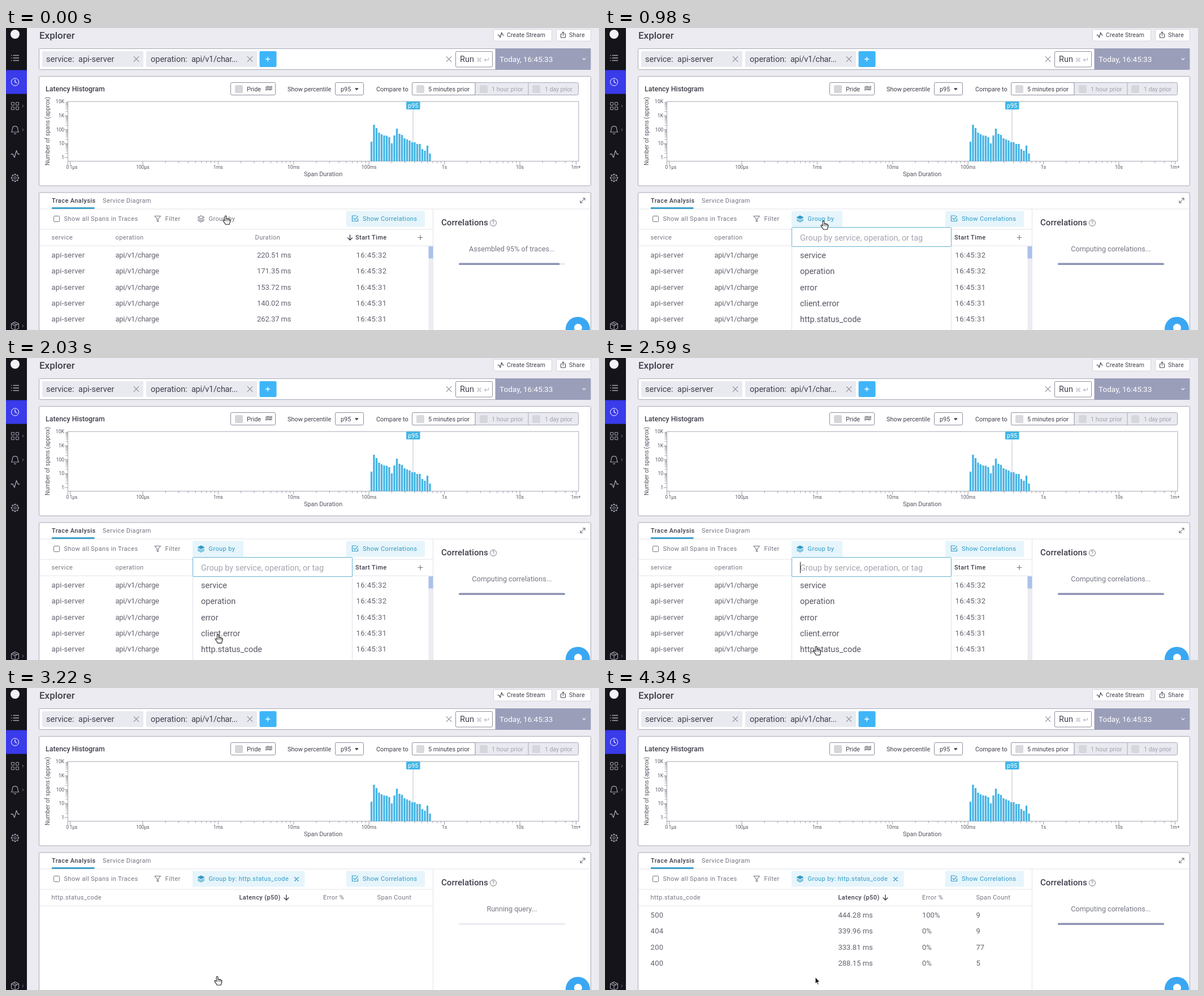
These frames come from a looping animation (1049 by 534 pixels, 4.41 s). An HTML page:

```html
<!DOCTYPE html>
<html lang="en">
<head>
<meta charset="utf-8">
<title>Explorer</title>
<style>
html, body { margin: 0; width: 100%; height: 100%; overflow: hidden; background: #ecebf1; }
svg { display: block; width: 100vw; height: 100vh; }
text { font-family: Roboto, "Liberation Sans", sans-serif; white-space: pre; }
</style>
</head>
<body>
<svg id="stage" viewBox="0 0 1049 534" preserveAspectRatio="none"></svg>
<script>
const LOOP = 4410;
const OPEN = 280, COMPUTE = 490, PICK = 2940, SKELETON = 3430, RESULT = 3850;
const INK = '#3f404c', GREY = '#757783', BLUE = '#2f9bc6', EDGE = '#a8a9b6', LINE = '#e4e4eb', PALE = '#e6f5fb';
const ROWS = [401, 429.5, 458, 486, 514.5];
const TOOLS = 337.4;

const rect = (x, y, w, h, fill, stroke = 'none', r = 0) =>
  `<rect x="${x}" y="${y}" width="${w}" height="${h}" fill="${fill}" stroke="${stroke}" rx="${r}"/>`;
const path = (d, stroke, width = 1.2, fill = 'none') =>
  `<path d="${d}" stroke="${stroke}" stroke-width="${width}" fill="${fill}" stroke-linecap="round" stroke-linejoin="round"/>`;
const dot = (x, y, r, fill, stroke = 'none') => `<circle cx="${x}" cy="${y}" r="${r}" fill="${fill}" stroke="${stroke}"/>`;
const at = (x, y, body) => `<g transform="translate(${x} ${y})">${body}</g>`;
const group = (id, body) => `<g id="${id}">${body}</g>`;

// y is the middle of the capitals
const text = (x, y, str, size, fill = GREY, { weight = 400, gap = 0, anchor = 'start' } = {}) =>
  `<text x="${x}" y="${y + size * 0.36}" font-size="${size}" fill="${fill}" font-weight="${weight}" letter-spacing="${gap}" text-anchor="${anchor}">${str}</text>`;
const label = (x, y, str, fill = GREY, weight = 400) => text(x, y, str, 11, fill, { weight, gap: 0.41 });
const cell = (x, y, str, gap = 0) => text(x, y, str, 13, '#62636f', { gap });
const cross = (x, y, r, color, w) => path(`M${x - r} ${y - r}l${2 * r} ${2 * r}m0 ${-2 * r}l${-2 * r} ${2 * r}`, color, w);
const plus = (x, y, r, color, w) => path(`M${x - r} ${y}h${2 * r}m${-r} ${-r}v${2 * r}`, color, w);
const pulse = (x, y, s, color, w) => path(`M${x - s} ${y}h${s * 0.45}l${s * 0.4} ${s * 0.85}l${s * 0.5} ${-s * 1.75}l${s * 0.4} ${s * 0.9}h${s * 0.35}`, color, w);
const downArrow = (x, y, color) => path(`M${x} ${y - 4.5}v9m-4 -4l4 4l4 -4`, color, 1.4);
const layers = (x, y, color, fill) => at(x, y, path('M0-5.5L5.5-2.7L0 0L-5.5-2.7Z', color, 1.1, fill) + path('M-5.5 .2L0 3L5.5 .2M-5.5 2.8L0 5.6L5.5 2.8', color, 1.1));

function sidebar() {
  const c = '#a4a5b3';
  const square = (x, y) => rect(x, y, 5, 5, 'none', c, 0.5);
  const chevron = y => path(`M29 ${y - 2}l2 2l-2 2`, '#777886', 1);
  let gear = '';
  for (let i = 0; i < 8; i++) gear += `<path d="M0-5.3V-7.2" transform="rotate(${i * 45})" stroke="${c}" stroke-width="2.4"/>`;
  return rect(0, 0, 37, 534, '#14141a') + rect(0, 74.5, 37, 42, '#3a3bea') + dot(16, 11, 8, '#f1f1f5')
    + [48.5, 53, 57.5].map(y => path(`M9.5 ${y}h.4M13 ${y}h9.5`, c, 1.3)).join('')
    + dot(16, 95.5, 6.6, 'none', '#fff') + path('M16 91.5v4l2.8 1.6', '#fff')
    + square(9.5, 131.5) + square(17.5, 131.5) + square(9.5, 139.5) + square(17.5, 139.5)
    + at(16, 180, path('M-6.5 4C-4.5 2-5-1-4.6-2.6C-4-7.6 4-7.6 4.6-2.6C5-1 4.5 2 6.5 4ZM-1.6 6.8Q0 8 1.6 6.8', c))
    + pulse(16, 223, 7, c, 1.3)
    + at(16, 265, gear + dot(0, 0, 5.5, '#14141a', c) + dot(0, 0, 2.2, 'none', c))
    + at(16, 527, path('M0-7.5L6.5-4V4L0 7.5L-6.5 4V-4ZM-6.5-4L0-.5L6.5-4M0-.5V7.5M-3.3-5.8L3.2-2.3', c, 1.1))
    + chevron(138) + chevron(180) + chevron(527);
}

function header() {
  return text(59, 12.9, 'Explorer', 17, INK, { weight: 500 })
    + rect(862.5, 2.5, 103, 20.5, '#fff', '#d3d3dd', 2) + pulse(875, 12.5, 5, INK, 1.1)
    + text(886, 12.4, 'Create Stream', 10.5, INK, { gap: 0.1 })
    + rect(973.5, 2.5, 61, 20.5, '#fff', '#d3d3dd', 2)
    + path('M983 10.5h-1.5v6.5h8V10.5H988M985.5 13.5V7m-2.3 2.2l2.3-2.2l2.3 2.2', INK, 1)
    + text(996, 12.4, 'Share', 10.5, INK, { gap: 0.25 });
}

function queryBar() {
  const chip = (x, w) => rect(x, 41, w, 28, '#e9e9f0', 'none', 2) + cross(x + w - 12.5, 55, 4.3, '#8b8c99', 1.1);
  const big = (x, str, gap = 0) => text(x, 55, str, 14.5, INK, { gap });
  return rect(58.5, 36.5, 808, 37, '#fff', EDGE, 2) + rect(865.5, 36, 169, 38, '#9a9eb9', 'none', 1)
    + chip(64, 179) + big(71, 'service:') + big(128, 'api-server')
    + chip(248, 196) + big(256, 'operation:') + big(328, 'api/v1/char...', -0.3)
    + rect(448.5, 41, 30, 28, '#3eb5f9', 'none', 2) + plus(463.2, 55, 3.5, '#fff', 1.3)
    + cross(783.5, 55, 4.3, '#8b8c99', 1.1)
    + rect(795.5, 41.5, 65, 27.5, '#fff', '#8d8e9c', 2) + big(803, 'Run')
    + text(832, 56, '⌘', 10, '#b5b6c1') + path('M853.5 53v3.5h-7m2.2-2.2l-2.2 2.2l2.2 2.2', '#b5b6c1', 1.1)
    + text(873, 55, 'Today, 16:45:33', 13.6, '#fff')
    + path('M1020 53.7l2.5 2.5l2.5-2.5', '#fff', 1.1);
}

function histogram() {
  const small = (x, y, str, fill = INK, gap = 0) => text(x, y, str, 10.9, fill, { gap });
  const box = (x, fill) => rect(x, 101, 14, 14, fill, 'none', 2.5);
  const tick = (x, y, str, anchor) => text(x, y, str, 8.5, '#555663', { anchor });
  const tops = [201, 171, 177, 185, 188, 190, 190.5, 193, 204, 190, 178, 187, 189, 195, 197, 199, 202, 202, 205, 205, 214, 217, 208, 222];
  let marks = 'M109.5 236v5M113.5 236v5M1008.5 236v5';
  for (let k = 0; k < 6; k++) for (let m = 1; m < 10; m++) {
    const x = 242 + 133.4 * (k + Math.log10(m));
    if (x < 1012) marks += `M${x} 236v${m === 1 ? 5 : 2.5}`;
  }
  for (let k = 0; k < 4; k++) for (let m = 1; m < 10; m++)
    marks += `M109 ${229 - 24.65 * (k + Math.log10(m))}h${m === 1 ? -5 : -3}`;
  return rect(58.5, 85.5, 976, 193.5, '#fff', EDGE, 2)
    + text(70, 107.6, 'Latency Histogram', 12.4, INK, { weight: 500 })
    + rect(397.5, 96.5, 79, 22, '#fff', '#8d8e9c', 2) + box(405, '#d5d5da') + small(426, 107.8, 'Pride')
    + path('M459.5 104q3-2 5.5-.8t5.5-.7v6.5q-3 1.8-5.5 .6t-5.5 .8z', '#8f9098', 0.6, 'url(#flag)')
    + small(498, 107.8, 'Show percentile')
    + rect(582.5, 96.5, 50, 22, '#fff', '#8d8e9c', 2) + small(592, 107.8, 'p95') + path('M618 106.8h5l-2.5 2.8z', INK, 1, INK)
    + small(655, 107.8, 'Compare to')
    + rect(718.5, 96.5, 294, 22, '#e9e9f0', EDGE, 2) + rect(718.5, 96.5, 111.5, 22, '#fff', '#8d8e9c', 2)
    + path('M924 96.5v22', EDGE, 1)
    + box(726, '#d9d9de') + small(747, 107.8, '5 minutes prior')
    + box(838, '#d6d6de') + small(859, 107.8, '1 hour prior', '#a3a4b0')
    + box(931, '#d6d6de') + small(953, 107.8, '1 day prior', '#a3a4b0', -0.2)
    + rect(109.5, 130, 903.5, 105.5, '#fff', EDGE) + path(marks, '#93949f', 0.9)
    + path('M720 144v91', '#ccd0dd', 1.3)
    + tops.map((y, i) => rect(644.8 + i * 4.5, y, 3.3, 235.5 - y, '#46b4e4')).join('')
    + rect(708, 130, 24.5, 14, '#42b6e6', 'none', 1.5) + text(720.2, 136.8, 'p95', 10.6, '#fff', { anchor: 'middle', gap: 0.1 })
    + ['1', '10', '100', '1K', '10K'].map((s, i) => tick(103, 229 - i * 24.65, s, 'end')).join('')
    + tick(109, 246.2, '0', 'middle') + tick(119.5, 246.2, '1µs', 'middle')
    + ['100µs', '1ms', '10ms', '100ms', '1s', '10s'].map((s, i) => tick(242 + 133.4 * i, 246.2, s, 'middle')).join('')
    + tick(1008, 246.2, '1m+', 'middle')
    + small(527, 258.2, 'Span Duration', '#555663')
    + at(73.5, 243, `<g transform="rotate(-90)">${text(0, 0, 'Number of spans (approx)', 10.4, '#555663')}</g>`);
}

function panel() {
  return rect(58.5, 291, 976, 260, '#fff', EDGE, 2)
    + label(81, 304.7, 'Trace Analysis', INK, 500) + label(171, 304.7, 'Service Diagram')
    + path('M59 320h975M59.5 356h696M59.5 385h696M755.5 320v214', LINE, 1)
    + rect(81, 317, 75.5, 3, '#3d9fca')
    + path('M1016 309l8-8m-3.5 0h3.5v3.5M1016 305.5v3.5h3.5', '#555663', 1)
    + rect(84.5, 332.5, 10, 10, '#fff', GREY, 1) + label(102.5, TOOLS, 'Show all Spans in Traces')
    + path('M263 332.5h10.5l-4.2 5v5l-2-1.3v-3.7z', GREY, 1.1) + label(281.5, TOOLS, 'Filter')
    + rect(602, 323.5, 139, 28, PALE, 'none', 2)
    + path('M622.5 337v4.5h-10v-9.5h7M614.8 336.3l2.5 2.5l5.2-6', BLUE, 1.2)
    + label(631, TOOLS, 'Show Correlations', BLUE)
    + text(770, 343.5, 'Correlations', 15.1, INK, { weight: 500 })
    + dot(862, 344.7, 5.5, 'none', GREY) + text(862, 345, '?', 9, GREY, { anchor: 'middle' })
    + group('status', '') + rect(801, 415.5, 188, 3.6, '#ebebf2', 'none', 1.5)
    + '<rect id="progress" x="801" y="415.5" height="3.6" rx="1.5" fill="#8d93b4"/>';
}

function traces() {
  const times = [220.51, 171.35, 153.72, 140.02, 262.37];
  return label(80.5, 370.5, 'service') + label(193.5, 370.5, 'operation') + label(440.5, 370.5, 'Duration')
    + downArrow(608.5, 370.5, INK) + label(618, 370.5, 'Start Time', INK, 500) + plus(733, 370.5, 4, GREY, 1.2)
    + ROWS.map((y, i) => cell(80.5, y, 'api-server', 0.2) + cell(193.5, y, 'api/v1/charge', -0.33)
      + cell(444, y, times[i].toFixed(2) + ' ms', -0.1) + cell(619.5, y, '16:45:3' + (i < 2 ? 2 : 1), 0.5)).join('')
    + rect(747.5, 386, 8, 150, '#ececf2') + rect(747.5, 386, 8, 21.5, '#abc1ea');
}

function dropdown() {
  const names = ['service', 'operation', 'error', 'client.error', 'http.status_code'];
  return rect(330.5, 386, 282, 160, '#fff', '#e0e1ea')
    + names.map((s, i) => text(345, ROWS[i] + 0.7, s, 14.5, '#565762')).join('')
    + rect(330.5, 352.5, 282, 34, '#fff', '#62b2d2', 1)
    + text(345, 370.5, 'Group by service, operation, or tag', 14.4, '#a5a6b0')
    + group('caret', path('M345.5 361v19', '#222', 1));
}

function groupedHead() {
  return rect(330, 323.5, 198.5, 28, PALE, 'none', 2) + layers(345, 337.5, BLUE, BLUE)
    + label(358.5, TOOLS, 'Group by: http.status_code', BLUE) + cross(514, 338, 3.3, BLUE, 1.3)
    + label(80.5, 370.5, 'http.status_code') + label(412.5, 370.5, 'Latency (p50)', INK, 500) + downArrow(496, 370.5, INK)
    + label(561, 370.5, 'Error %') + label(656.5, 370.5, 'Span Count');
}

const results = () => [['500', '444.28 ms', '100%', '9'], ['404', '339.96 ms', '0%', '9'], ['200', '333.81 ms', '0%', '77'], ['400', '288.15 ms', '0%', '5']]
  .map((row, i) => row.map((s, j) => cell([80.5, 412.5, 561, 656.5][j], ROWS[i], s, j ? 0 : 0.35)).join('')).join('');

const skeleton = () => ROWS.map(y => [[80.5, 310.5], [412, 127.5], [561, 74], [656, 78]]
  .map(([x, w]) => rect(x, y - 9, w, 18, 'url(#shimmer)')).join('')).join('') + path('M59.5 526h696', '#f3f3f7', 1);

const groupButton = open => (open ? rect(330, 323.5, 90, 28, PALE, 'none', 2) : '')
  + layers(345, 337.5, open ? BLUE : GREY, open ? BLUE : 'none') + label(358.5, TOOLS, 'Group by', open ? BLUE : GREY);

const pointers = {
  hand: path('M-2.8 1V-6.5a1.4 1.4 0 0 1 2.8 0V-2.2Q.2-3.3 1.4-3.2T2.7-1.8Q3-2.7 4-2.6T5.2-1.2Q7-1.7 7 .2C7 3.3 5.4 4 5.2 7.3H-1.8C-2.2 5-4.6 3.4-5.8 1.2C-6.8-.6-4.8-1.6-2.8 1Z', '#222', 1.1, '#fff')
    + path('M0-2v3.3M2.7-1.6v2.9M5.2-1v2.5', '#222', 0.8),
  beam: path('M-2.5-6.5Q0-6.5 0-5Q0-6.5 2.5-6.5M0-5V5M-2.5 6.5Q0 6.5 0 5Q0 6.5 2.5 6.5M-1.5 2h3', '#222', 1.2),
  arrow: path('M-3-6.5V5L-.4 2.5L1.3 6.5L3.2 5.7L1.5 1.9H5Z', '#fff', 1, '#16161a')
};

document.getElementById('stage').innerHTML = `<defs>
  <linearGradient id="flag" x2="0" y2="1"><stop stop-color="#777"/><stop offset=".5" stop-color="#c5c5c8"/><stop offset="1" stop-color="#686870"/></linearGradient>
  <linearGradient id="shimmer"><stop offset=".05" stop-color="#ededf3"/><stop offset=".25" stop-color="#dbdbe5"/><stop offset=".35" stop-color="#dedee8"/><stop offset=".6" stop-color="#ededf3"/></linearGradient></defs>`
  + rect(0, 0, 1049, 534, '#ecebf1') + header() + queryBar() + histogram() + panel()
  + group('traces', traces()) + group('buttonIdle', groupButton(false)) + group('buttonOpen', groupButton(true)) + group('dropdown', dropdown())
  + group('grouped', groupedHead()) + group('skeleton', skeleton()) + group('results', results())
  + sidebar() + dot(1011.5, 532.3, 21.6, '#3ba7f3') + dot(1012, 530, 7, '#fff')
  + group('cursor', Object.keys(pointers).map(k => group(k, pointers[k])).join(''));

const el = id => document.getElementById(id);
const show = (id, on) => el(id).setAttribute('display', on ? 'inline' : 'none');
const stops = [[0, 390, 340], [420, 389, 346], [980, 388, 349], [1180, 388, 349], [1480, 383, 385], [1620, 383, 385], [2170, 375, 518], [LOOP, 375, 518]];
let statusText = '';

function cursorAt(t) {
  const i = stops.findIndex(s => s[0] > t);
  const [a, b] = [stops[i - 1], stops[i]];
  const u = (t - a[0]) / (b[0] - a[0]), e = u * u * (3 - 2 * u);
  return [a[1] + (b[1] - a[1]) * e, a[2] + (b[2] - a[2]) * e];
}

function render(t) {
  const open = t >= OPEN && t < PICK, done = t >= RESULT;
  show('traces', t < PICK);
  show('buttonIdle', t < OPEN);
  show('buttonOpen', open);
  show('dropdown', open);
  show('caret', (t - OPEN) % 1000 < 500);
  show('grouped', t >= PICK);
  show('skeleton', t >= SKELETON && !done);
  show('results', done);
  el('shimmer').setAttribute('gradientTransform', `translate(${(t - 3780) / 470} 0)`);

  const status = t < COMPUTE ? 'Assembled 95% of traces...' : t < PICK || done ? 'Computing correlations...' : 'Running query...';
  if (status !== statusText) el('status').innerHTML = text(895, 390.4, statusText = status, 12.6, GREY, { anchor: 'middle' });
  el('progress').setAttribute('width', t < COMPUTE ? 178.5 : t < PICK || done ? 188 : 0);

  const [x, y] = cursorAt(t);
  const kind = done ? 'arrow' : open && y > 354 && y < 387 ? 'beam' : 'hand';
  for (const k in pointers) show(k, k === kind);
  el('cursor').setAttribute('transform', `translate(${x} ${y})`);
}

const start = performance.now();
function frame() {
  render((performance.now() - start) % LOOP);
  requestAnimationFrame(frame);
}
render(0);
requestAnimationFrame(frame);
</script>
</body>
</html>
```
